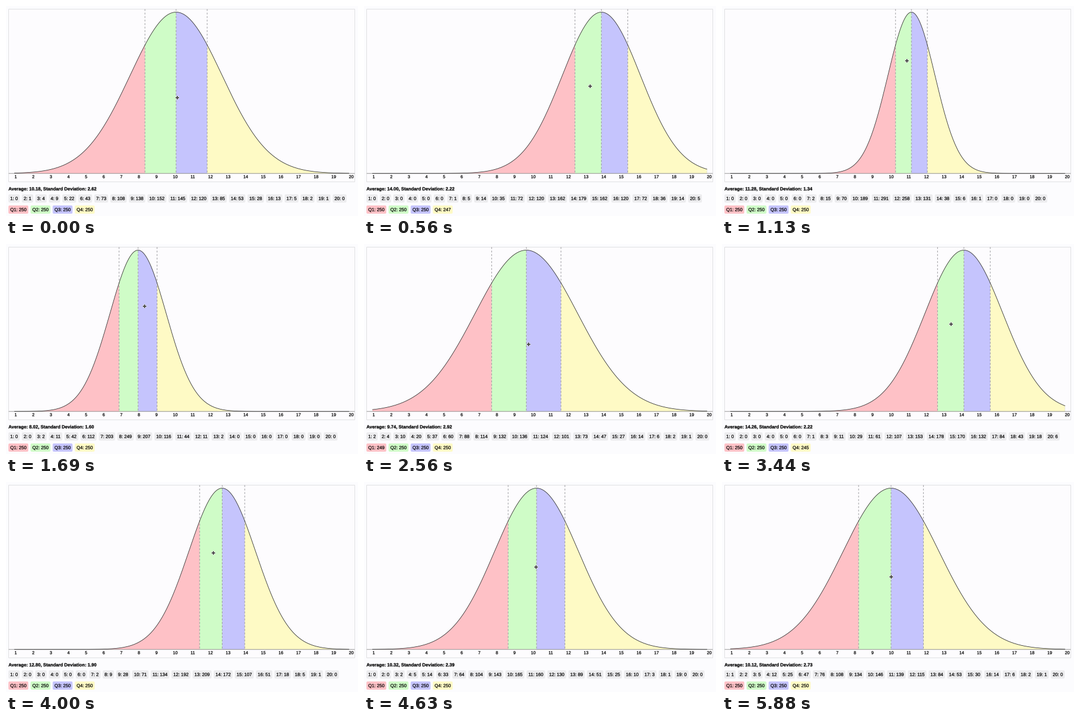
Animation, 600 px wide and 359 px high, one loop 5.94 s. Source, as a matplotlib script:

```python
import math

import matplotlib.pyplot as plt
import numpy as np
from matplotlib.animation import FuncAnimation
from matplotlib.patches import FancyBboxPatch, PathPatch, Polygon, Rectangle
from matplotlib.path import Path
from matplotlib.textpath import TextPath

W, H, DPI = 600, 359, 100
LOOP, FRAMES, STEPS = 5940, 198, 95
PX = 72 / DPI
TOP, BASE = 10.5, 286.2
QUARTILE = 0.67449
TEXT, TICK = 7.8, 7.3
PAD, GAP, LEFT = 3, 3.95, 4.2
TINTS = ["#fec1c6", "#cffcc7", "#c5c4fd", "#fefac5"]

# Turning points of the drag: step, mean, deviation.
DRAG = np.array([
    (0, 10.18, 2.62), (10, 14.3, 2.1), (18, 11.28, 1.34), (27, 8.02, 1.60),
    (33, 7.7, 2.0), (41, 9.74, 2.92), (55, 14.26, 2.22), (64, 12.8, 1.9),
    (74, 10.32, 2.39), (94, 10.12, 2.73),
])
KNOTS, POSES = DRAG[:, 0], DRAG[:, 1:]


def knot_slopes():
    """Harmonic mean of neighbouring slopes, flat at every extreme."""
    rate = np.diff(POSES, axis=0) / np.diff(KNOTS)[:, None]
    a, b = rate[:-1], rate[1:]
    inner = np.where(a * b > 0, 2 * a * b / (a + b), 0)
    return np.vstack([rate[0], inner, 0 * rate[0]])


SLOPES = knot_slopes()


def pose(step):
    """Mean and deviation on a smooth curve through the turning points."""
    step = min(step, KNOTS[-1])
    i = min(np.searchsorted(KNOTS, step, side="right") - 1, len(KNOTS) - 2)
    h = KNOTS[i + 1] - KNOTS[i]
    u = (step - KNOTS[i]) / h
    return ((1 + 2 * u) * (1 - u) ** 2 * POSES[i]
            + u * (1 - u) ** 2 * h * SLOPES[i]
            + u * u * (3 - 2 * u) * POSES[i + 1]
            + u * u * (u - 1) * h * SLOPES[i + 1])


def to_x(value):
    return 14.5 + 30 * (value - 1)


def bell(values, mean, dev):
    return np.exp(-0.5 * ((values - mean) / dev) ** 2)


def cdf(z):
    return 0.5 * (1 + math.erf(z / math.sqrt(2)))


def advance(s):
    """Text width from the font's metrics, with its tight pair of ones."""
    em = {":": 0.278, " ": 0.278, "Q": 0.778}
    return TEXT * (sum(em.get(c, 0.556) for c in s) - 0.074 * s.count("11"))


outlines = {}


def glyphs(s, x, y, size=TEXT, weight="normal"):
    key = s, size, weight
    if key not in outlines:
        font = {"family": "Liberation Sans", "weight": weight}
        outlines[key] = TextPath((0, 0), s, size=size, prop=font)
    path = outlines[key]
    return Path(path.vertices * [1, -1] + [x, y], path.codes)


fig = plt.figure(figsize=(W / DPI, H / DPI), dpi=DPI, facecolor="#fcfcfe")
ax = fig.add_axes([0, 0, 1, 1])
ax.set(xlim=(0, W), ylim=(H, 0))
ax.axis("off")


def ink(path):
    return ax.add_patch(PathPatch(path, fc="black", ec="black", lw=0.25 * PX,
                                  zorder=6))


def chip(y, color):
    box = FancyBboxPatch((0, y), 20, 14, fc=color, lw=0, zorder=5,
                         boxstyle="round,pad=0,rounding_size=2")
    return ax.add_patch(box)


def stroke(xs, ys, color, width, z, **style):
    line, = ax.plot(xs, ys, color=color, lw=width * PX, zorder=z,
                    snap=False, **style)
    return line


def lay_out(labels, chips, baseline):
    """Place a row of chips and return the outline of its text."""
    x, paths = LEFT, []
    for label, box in zip(labels, chips):
        width = advance(label) + 2 * PAD
        box.set_x(x)
        box.set_width(width)
        paths.append(glyphs(label, x + PAD, baseline))
        x += width + GAP
    return Path.make_compound_path(*paths)


ax.add_patch(Rectangle((4.5, 5.4), 590, 295.2, fc="#fdfcfe", ec="#e0e0e2",
                       lw=PX, zorder=0, snap=False))
stroke([5, 594], [BASE, BASE], "#8c8c8c", 0.9, 2)
ink(Path.make_compound_path(
    *(glyphs(str(k), to_x(k), 294.3, TICK) for k in range(1, 21))))

areas = [ax.add_patch(Polygon([(0, 0)] * 3, fc=c, lw=0, zorder=1))
         for c in TINTS]
dashes = [stroke([0, 0], [5.4, BASE], "#98989c", 1, 3, dashes=(3, 3),
                 dash_capstyle="butt") for _ in range(3)]
curve = stroke([], [], "#2c2c2c", 0.8, 4)

count_chips = [chip(322, "#ececee") for _ in range(20)]
quart_chips = [chip(341, c) for c in TINTS]
blank = glyphs("0", 0, 0)
summary, count_text, quart_text = (ink(blank) for _ in range(3))

# Four-way move pointer: one arrow turned by quarters.
arm = np.array([(0.45, 0.45), (0.45, 1.6), (1.4, 1.6), (0, 3.2),
                (-1.4, 1.6), (-0.45, 1.6)])
turn = np.array([(0, 1), (-1, 0)])
cross = np.vstack([arm @ np.linalg.matrix_power(turn, q) for q in range(4)])
halo = ax.add_patch(Polygon(cross, fc="white", ec="white", lw=1.2 * PX, zorder=8))
pointer = ax.add_patch(Polygon(cross, fc="black", lw=0, zorder=9))


def update(frame):
    # The picture refreshes in steps a little over 62 ms long.
    step = int((frame * LOOP / FRAMES + 20) * STEPS / LOOP)
    mean, dev = pose(step)

    def outline(lo):
        v = np.linspace(lo, 20, 300)
        return to_x(v), BASE - (BASE - TOP) * bell(v, mean, dev)

    # Each area runs to the right end and is covered by the next.
    cuts = [mean + dev * QUARTILE * k for k in (-1, 0, 1)]
    for area, lo in zip(areas, [1, *cuts]):
        edge = np.column_stack(outline(lo))
        area.set_xy([(to_x(lo), BASE), *edge, (to_x(20), BASE)])
    for dash, cut in zip(dashes, cuts):
        dash.set_xdata([to_x(cut)] * 2)
    curve.set_data(*outline(1))

    summary.set_path(glyphs(
        f"Average: {mean:.2f}, Standard Deviation: {dev:.2f}",
        LEFT, 315.2, weight="bold"))
    k = np.arange(1, 21)
    counts = 1000 * bell(k, mean, dev) / (dev * math.sqrt(2 * math.pi))
    count_text.set_path(lay_out(
        [f"{n}: {c:.0f}" for n, c in zip(k, counts)], count_chips, 331.7))
    lost = [cdf((1 - mean) / dev), 0, 0, cdf((mean - 20) / dev)]
    quart_text.set_path(lay_out(
        [f"Q{n}: {250 - 1000 * p:.0f}" for n, p in enumerate(lost, 1)],
        quart_chips, 350.7))

    # The pointer runs slightly ahead of the curve.
    spot = [39 + 24.65 * pose(step + 0.2)[0], 27.6 + 49.3 * dev]
    for part in (halo, pointer):
        part.set_xy(cross + spot)
    return []


anim = FuncAnimation(fig, update, frames=FRAMES, interval=LOOP // FRAMES,
                     repeat=True, repeat_delay=0, blit=False)
plt.show()
```
